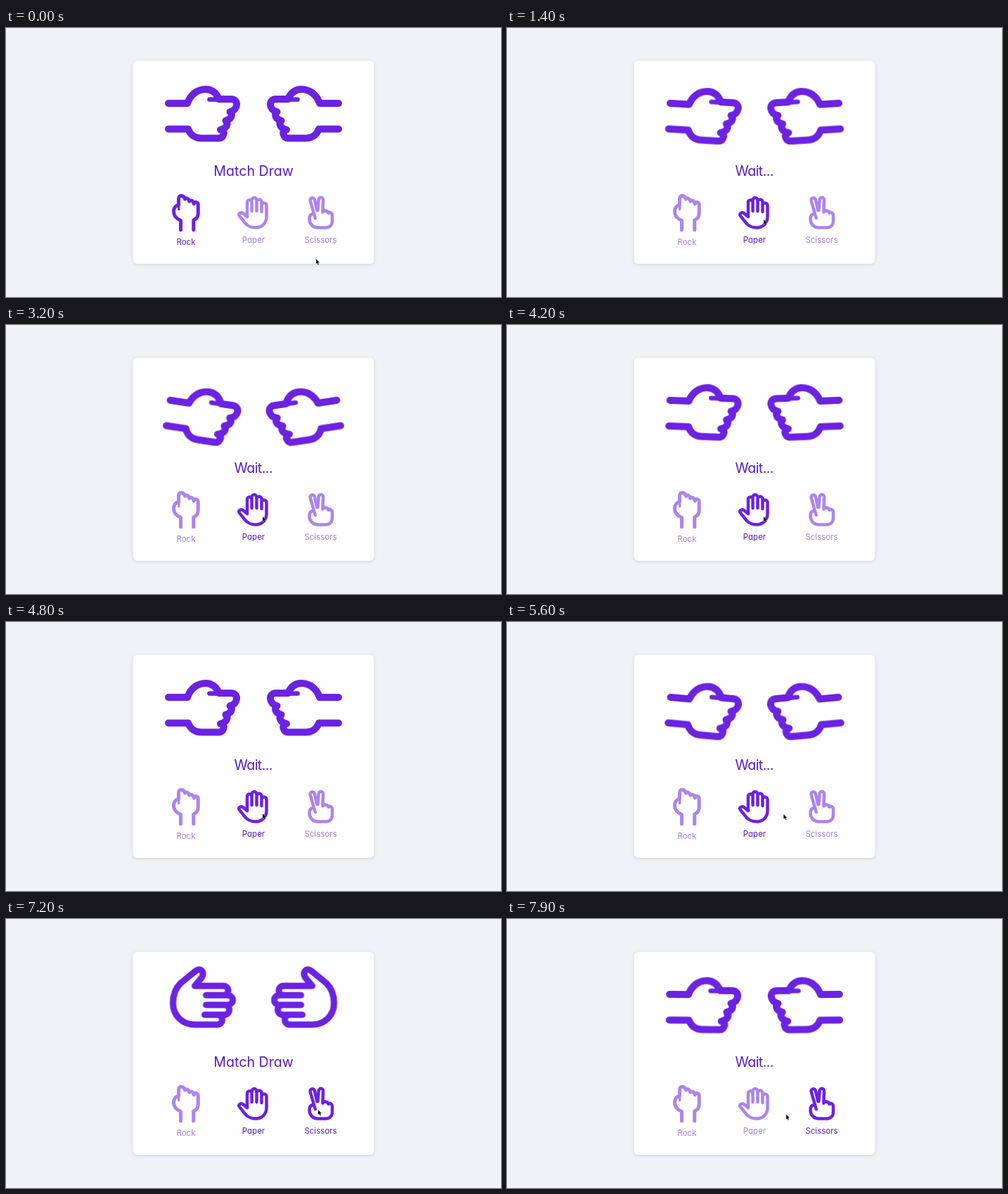
An HTML page for the animation above (8 s loop, 704 px wide and 382 px high).

```html
<!DOCTYPE html>
<html lang="en">
<head>
<meta charset="utf-8">
<title>Rock Paper Scissors</title>
<style>
  html, body { margin: 0; width: 100%; height: 100%; overflow: hidden; background: #f0f2f7; }
  svg { display: block; width: 704px; height: 382px; }
  .card { fill: #fefefe; filter: drop-shadow(0 1px 2px rgba(30, 30, 60, .16)); }
  .line { fill: none; stroke: #6c22e2; stroke-linecap: round; stroke-linejoin: round; }
  .small { stroke-width: 4.5; }
  .shake { transform-origin: 233px 124px; }
  text {
    font-family: Inter, "Open Sans", sans-serif;
    font-feature-settings: "cv11";
    text-anchor: middle;
    fill: #5a1bc8;
  }
  .title { font-size: 19.6px; }
  #wait { letter-spacing: -.6px; }
  .label { font-size: 11.5px; }
  .cursor { fill: #0a0a0a; stroke: #fff; stroke-width: .7; paint-order: stroke; }
</style>
</head>
<body>
<svg viewBox="0 0 704 382">
  <defs>
    <!-- fist pointing right, centred on the origin -->
    <g id="fist" transform="translate(-279.5 -122)">
      <path stroke-width="10" d="
        M231 107 H258 C262 95 272 87 284 87 C293 87 299 92 303 101
        H320 C326 101 328.3 105 328 109 C327.5 114.5 324.5 117.5 318.5 119
        C323.5 124 320 129.5 312.5 131.5 C317 137 313.5 142.5 305 144.5
        C310 146 310.5 149 309 152 C308 155 306 156.5 303 156.5
        H278 C267 156.5 262 151 259 143.5 H231"/>
      <path stroke-width="6.6" d="M289.5 101.5 H304"/>
    </g>
    <path id="palm" transform="translate(-351 -262.5)" stroke-width="4.5" d="
      M343 268 L337 263 C333 260.8 329.8 264 332.2 267.2 L341 278
      C345 282 349 283.5 355 283.5 C364 283.5 370.5 277 370.5 268 V252 a3.5 3.5 0 0 0 -7 0
      M343 268 V247.5 a3.3 3.3 0 0 1 6.6 0 V260
      M349.6 248 V244.5 a3.45 3.45 0 0 1 6.9 0 V260
      M356.5 247 a3.5 3.5 0 0 1 7 0 V261"/>
  </defs>

  <rect class="card" x="180.5" y="46.5" width="343" height="288.5" rx="6"/>

  <g>
    <g class="line fists"><g class="shake"><use href="#fist" x="279.5" y="122"/></g></g>
    <g class="line palms"><use href="#palm" transform="translate(279.5 111) rotate(90) scale(2)"/></g>
  </g>
  <g transform="matrix(-1 0 0 1 704 0)">
    <g class="line fists"><g class="shake"><use href="#fist" x="279.5" y="122"/></g></g>
    <g class="line palms"><use href="#palm" transform="translate(279.5 111) rotate(90) scale(2)"/></g>
  </g>

  <text class="title" id="draw" x="352" y="209.7">Match Draw</text>
  <text class="title" id="wait" x="351.7" y="209.7">Wait...</text>

  <g id="rock">
    <use class="line" href="#fist" transform="translate(256 262.5) rotate(-90) scale(.5)"/>
    <text class="label" x="256" y="308">Rock</text>
  </g>
  <g id="paper">
    <use class="line" href="#palm" x="351" y="262.5"/>
    <text class="label" x="352" y="305">Paper</text>
  </g>
  <g id="scissors">
    <path class="line small" d="
      M439.8 270 L432.6 245 a3.2 3.2 0 0 1 6.2 -1.5 L442.3 259
      M443.4 259 L444.6 243.8 a3.2 3.2 0 0 1 6.4 .5 L450.4 261.5
      C452 258.5 457.5 258.5 458.5 262.7 C461 260.7 464 263 464 266 V274
      C464 280 460 283.5 455 283.5 H444 C436 283.5 431.5 278 431.5 271
      C431.5 266.5 433.5 264 437.5 264"/>
    <text class="label" x="447.5" y="305">Scissors</text>
  </g>

  <path id="cursor" class="cursor" d="M0 0 V7 L1.6 5.6 L2.8 8.3 L4 7.8 L2.8 5.2 L4.9 5 Z"/>
</svg>

<script>
  const LOOP = 8000, HALF = 337.5, SWING = 9.2, WAIT = 2620, DIM = 0.55;
  const clicks = [940, 4140, 7340];

  const play = (sel, frames) => document.querySelectorAll(sel).forEach(el =>
    el.animate(frames, { duration: LOOP, iterations: Infinity }));

  // Hard switches: steps are [time, opacity]
  const toggle = (sel, steps) => {
    const frames = steps.map(([t, opacity]) => ({ offset: t / LOOP, opacity, easing: "steps(1, end)" }));
    play(sel, [...frames, { offset: 1, opacity: steps[steps.length - 1][1] }]);
  };

  const rounds = (start, waiting, done) =>
    [[0, start], ...clicks.flatMap(c => [[c, waiting], [c + WAIT, done]])].filter(s => s[0] < LOOP);

  toggle("#wait", rounds(0, 1, 0));
  toggle("#draw", rounds(1, 0, 1));
  toggle(".palms", rounds(0, 0, 1));
  toggle(".fists", rounds(1, 1, 0));

  toggle("#rock", [[0, 1], [940, DIM]]);
  toggle("#paper", [[0, DIM], [680, 1], [7340, DIM]]);
  toggle("#scissors", [[0, DIM], [6860, 1]]);

  const swing = [{ offset: 0, transform: "rotate(0deg)" }];
  for (const c of clicks)
    for (let k = 0; k <= 8 && c + k * HALF < LOOP; k++)
      swing.push({
        offset: (c + k * HALF) / LOOP,
        transform: `rotate(${k % 2 * SWING}deg)`,
        easing: "ease"
      });
  play(".shake", [...swing, { offset: 1, transform: "rotate(0deg)" }]);

  const path = [
    [0, 441, 328], [250, 441, 328], [800, 365, 272], [5050, 365, 272],
    [6250, 431, 274], [6830, 431, 274], [7200, 444, 271], [7400, 444, 271],
    [7880, 397, 277.5], [8000, 397, 277.5]
  ];
  play("#cursor", path.map(([t, x, y]) => ({
    offset: t / LOOP, transform: `translate(${x}px, ${y}px)`, easing: "ease-in-out"
  })));
</script>
</body>
</html>
```
